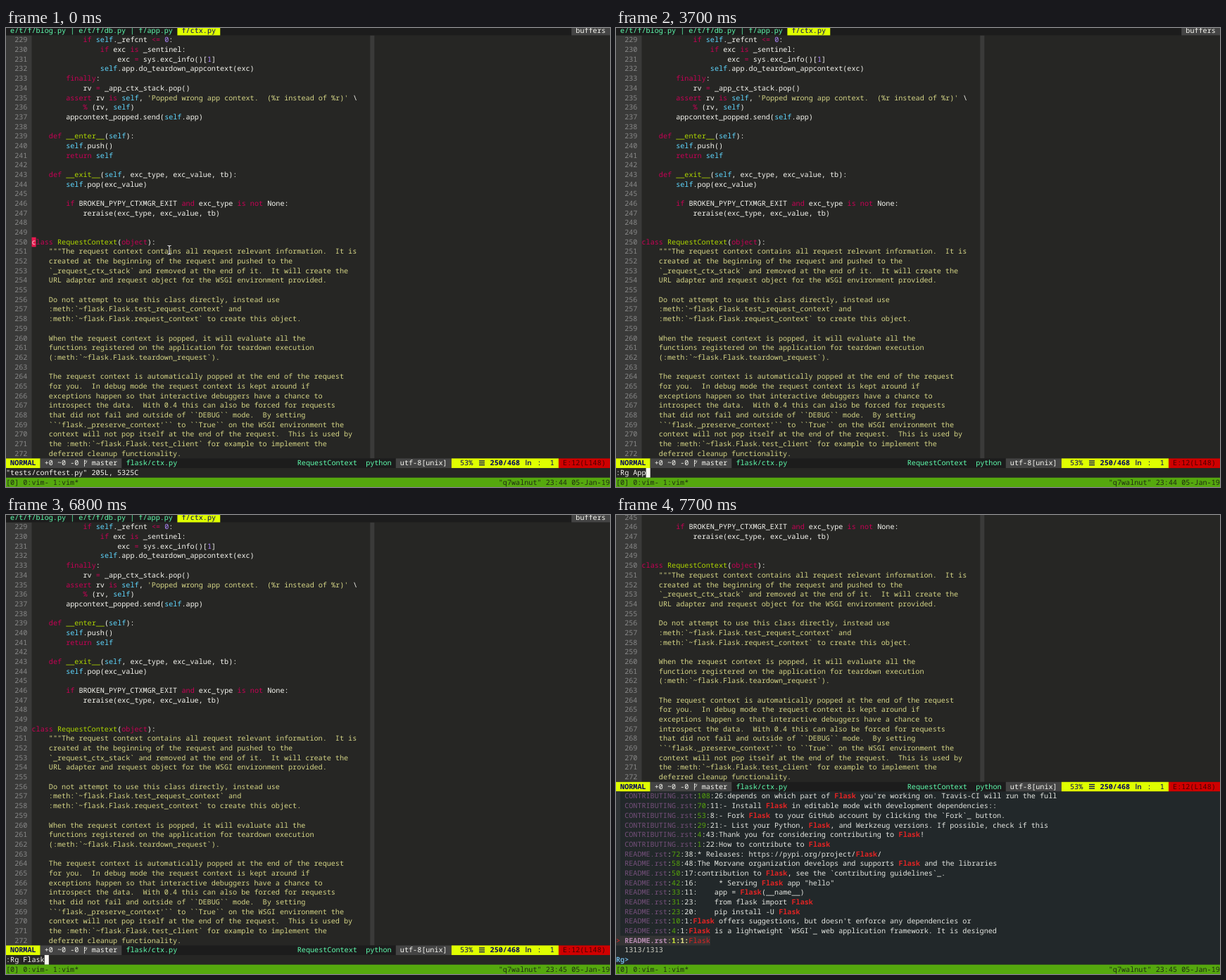
Write an HTML page that moves like this. It is 858 px wide and 653 px high and loops after 8 s.

```html
<!DOCTYPE html>
<html lang="en">
<head>
<meta charset="utf-8">
<title>Searching a project from the editor</title>
<style>
html, body { margin: 0; width: 100%; height: 100%; overflow: hidden; background: #262624; }
svg { display: block; width: 858px; height: 653px; }
text { font-family: "Noto Sans Mono", "DejaVu Sans Mono", monospace; font-size: 10.142px; white-space: pre; text-rendering: geometricPrecision; }
</style>
</head>
<body>
<svg id="stage" viewBox="0 0 858 653"></svg>
<script>
const CW = 858 / 141, RH = 13.68, TOP = -3.25, BASE = 10, LOOP = 8000;
const C = {
  bg: '#262624', gutter: '#3a3a39', num: '#878787', fg: '#f8f8f2', str: '#d7d787',
  key: '#c80055', name: '#afd700', self: '#5fd7ff', digit: '#af87ff',
  lime: '#dfff00', navy: '#00005f', grey: '#444444', bar: '#1c1c1c', mint: '#5fffaf',
  green: '#55a80e', ink: '#1f2a14', panel: '#22282a', path: '#75507b', match: '#e02424'
};
const stage = document.getElementById('stage');
const x = col => col * CW;
const y = row => TOP + row * RH;

function add(parent, tag, attrs) {
  const el = document.createElementNS('http://www.w3.org/2000/svg', tag);
  for (const k in attrs) el.setAttribute(k, attrs[k]);
  return parent.appendChild(el);
}
const group = () => add(stage, 'g', {});
function block(parent, row, col, cols, fill, rows = 1) {
  return add(parent, 'rect', { x: x(col), y: y(row), width: x(cols), height: rows * RH, fill });
}
// Draws a run of text on the character grid and returns the next column.
function put(parent, row, col, str, fill, bold) {
  const lead = str.length - str.trimStart().length;
  if (str.trim()) {
    const el = add(parent, 'text', { x: x(col + lead), y: y(row) + BASE, fill, 'font-weight': bold ? 700 : 400 });
    el.textContent = str.trim();
  }
  return col + str.length;
}
const show = (el, on) => el.setAttribute('visibility', on ? 'visible' : 'hidden');
const shift = (el, rows) => el.setAttribute('transform', `translate(0 ${-rows * RH})`);

const code = `            if self._refcnt <= 0:
                if exc is _sentinel:
                    exc = sys.exc_info()[1]
                self.app.do_teardown_appcontext(exc)
        finally:
            rv = _app_ctx_stack.pop()
        assert rv is self, 'Popped wrong app context.  (%r instead of %r)' \\
            % (rv, self)
        appcontext_popped.send(self.app)

    def __enter__(self):
        self.push()
        return self

    def __exit__(self, exc_type, exc_value, tb):
        self.pop(exc_value)

        if BROKEN_PYPY_CTXMGR_EXIT and exc_type is not None:
            reraise(exc_type, exc_value, tb)


class RequestContext(object):`.split('\n');

const doc = `    """The request context contains all request relevant information.  It is
    created at the beginning of the request and pushed to the
    \`_request_ctx_stack\` and removed at the end of it.  It will create the
    URL adapter and request object for the WSGI environment provided.

    Do not attempt to use this class directly, instead use
    :meth:\`~flask.Flask.test_request_context\` and
    :meth:\`~flask.Flask.request_context\` to create this object.

    When the request context is popped, it will evaluate all the
    functions registered on the application for teardown execution
    (:meth:\`~flask.Flask.teardown_request\`).

    The request context is automatically popped at the end of the request
    for you.  In debug mode the request context is kept around if
    exceptions happen so that interactive debuggers have a chance to
    introspect the data.  With 0.4 this can also be forced for requests
    that did not fail and outside of \`\`DEBUG\`\` mode.  By setting
    \`\`'flask._preserve_context'\`\` to \`\`True\`\` on the WSGI environment the
    context will not pop itself at the end of the request.  This is used by
    the :meth:\`~flask.Flask.test_client\` for example to implement the
    deferred cleanup functionality.`.split('\n');

const results = `CONTRIBUTING.rst:108:26:depends on which part of Flask you're working on. Travis-CI will run the full
CONTRIBUTING.rst:70:11:- Install Flask in editable mode with development dependencies::
CONTRIBUTING.rst:53:8:- Fork Flask to your GitHub account by clicking the \`Fork\`_ button.
CONTRIBUTING.rst:29:21:- List your Python, Flask, and Werkzeug versions. If possible, check if this
CONTRIBUTING.rst:4:43:Thank you for considering contributing to Flask!
CONTRIBUTING.rst:1:22:How to contribute to Flask
README.rst:72:38:* Releases: https://pypi.org/project/Flask/
README.rst:58:48:The Morvane organization develops and supports Flask and the libraries
README.rst:50:17:contribution to Flask, see the \`contributing guidelines\`_.
README.rst:42:16:     * Serving Flask app "hello"
README.rst:33:11:    app = Flask(__name__)
README.rst:31:23:    from flask import Flask
README.rst:23:20:    pip install -U Flask
README.rst:10:1:Flask offers suggestions, but doesn't enforce any dependencies or
README.rst:4:1:Flask is a lightweight \`WSGI\`_ web application framework. It is designed
README.rst:1:1:Flask`.split('\n');

const syntax = /(?<str>'.*?')|(?<name>(?<=def |class )\w+)|(?<key>\b(?:if|is|not|and|finally|assert|def|class|return|object)\b|<=|=|%)|(?<self>\bself\b)|(?<digit>\b\d+\b)/g;

function codeLine(parent, row, line) {
  let at = 0;
  for (const m of line.matchAll(syntax)) {
    put(parent, row, 6 + at, line.slice(at, m.index), C.fg);
    const kind = Object.keys(m.groups).find(k => m.groups[k]);
    put(parent, row, 6 + m.index, m[0], C[kind]);
    at = m.index + m[0].length;
  }
  put(parent, row, 6 + at, line.slice(at), C.fg);
}

function buildEditor() {
  const g = group();
  block(g, 1, 0, 6, C.gutter, 44);
  block(g, 1, 85, 1, C.gutter, 44);
  for (let row = 1; row <= 44; row++) put(g, row, 2, String(228 + row), C.num);
  code.forEach((line, i) => codeLine(g, 1 + i, line));
  doc.forEach((line, i) => put(g, 23 + i, 6, line, C.str));
  return g;
}

function buildTabs() {
  const g = group();
  block(g, 0, 0, 141, C.bar);
  put(g, 0, 1, 'e/t/f/blog.py | e/t/f/db.py | f/app.py', C.mint);
  block(g, 0, 40, 10, C.lime);
  put(g, 0, 41, 'f/ctx.py', C.navy);
  block(g, 0, 132, 9, C.grey);
  put(g, 0, 133, 'buffers', C.fg);
  return g;
}

function buildStatus() {
  const g = group(), row = 45, top = y(row);
  block(g, row, 0, 141, C.bar);
  block(g, row, 0, 8, C.lime);
  put(g, row, 1, 'NORMAL', C.navy, true);
  block(g, row, 8, 19, C.grey);
  put(g, row, 9, '+0 ~0 -0', C.fg);
  add(g, 'path', { d: `M111.5 ${top + 11.5}v-9.5M111.5 ${top + 8}q3.2 -1.5 3.4 -5M111.5 ${top + 5}q1.5 -.8 1.6 -2.6`, fill: 'none', stroke: C.fg, 'stroke-width': .8 });
  put(g, row, 20, 'master', C.fg);
  put(g, row, 28, 'flask/ctx.py', C.mint);
  put(g, row, 68, 'RequestContext', C.mint);
  put(g, row, 84, 'python', C.mint);
  block(g, row, 91, 13, C.grey);
  put(g, row, 92, 'utf-8[unix]', C.fg);
  block(g, row, 104, 25, C.lime);
  put(g, row, 106, '53%', C.navy);
  for (const dy of [3, 5.8, 8.6]) add(g, 'rect', { x: 672, y: top + dy, width: 8, height: 1.3, fill: C.navy });
  put(g, row, 113, '250/468', C.navy, true);
  const ln = add(g, 'text', { x: 737.5, y: top + BASE, fill: C.navy, style: 'font: 600 10px "Open Sans", sans-serif' });
  ln.textContent = 'ln';
  put(g, row, 124, ':  1', C.navy);
  block(g, row, 129, 12, '#cf0000');
  put(g, row, 130, 'E:12(L148)', '#4a0000');
  return g;
}

function buildResults() {
  const g = group();
  block(g, 29, 0, 141, C.panel, 18);
  block(g, 29, 0, 1, '#303436', 16);
  results.forEach((line, i) => {
    const row = 29 + i, picked = i === results.length - 1;
    const [, file, num, rest] = line.match(/^(.*?):(\d+)(:.*)$/);
    if (picked) {
      block(g, row, 0, 22, '#343434');
      put(g, row, 0, '>', C.match);
    }
    const plain = picked ? '#e4e48a' : '#e6e8e3';
    let col = put(g, row, 2, file, picked ? '#b58ab0' : C.path, picked);
    col = put(g, row, col, ':', plain);
    col = put(g, row, col, num, picked ? '#c5e234' : '#56a50a', picked);
    for (const part of rest.split(/(Flask)/)) {
      const hit = part === 'Flask';
      col = put(g, row, col, part, hit ? C.match : plain, picked ? !hit : hit);
    }
  });
  put(g, 45, 2, '1313/1313', '#d0d0c4');
  put(g, 46, 0, 'Rg>', '#6fb3dc', true);
  return g;
}

function buildPointer() {
  const g = group();
  const d = 'M229.5 309.5q2.5 0 2.5 1.5q0 -1.5 2.5 -1.5M232 311v9.5M229.5 322q2.5 0 2.5 -1.5q0 1.5 2.5 1.5';
  add(g, 'path', { d, fill: 'none', stroke: '#111', 'stroke-width': 2.4 });
  add(g, 'path', { d, fill: 'none', stroke: '#fff', 'stroke-width': 1.1 });
  return g;
}

const editor = buildEditor();
const codeCursor = group();
block(codeCursor, 22, 6, 1, '#e8194f');
put(codeCursor, 22, 6, 'c', '#f8d0d8');
const pointer = buildPointer();
const tabs = buildTabs();
const blank = block(stage, 29, 0, 141, C.bg, 18);
const status = buildStatus();
const list = buildResults();
const command = add(stage, 'text', { x: 0, y: y(46) + BASE, fill: C.fg });
const cursor = block(stage, 46, 0, 1, '#f8f8f0');
const tmux = group();
block(tmux, 47, 0, 141, C.green);
put(tmux, 47, 0, '[0] 0:vim- 1:vim*', C.ink);
put(tmux, 47, 115, '"q7walnut"', C.ink);
const clock = add(tmux, 'text', { x: x(126), y: y(47) + BASE, fill: C.ink });

const typing = [
  [0, '"tests/conftest.py" 205L, 5325C'], [1000, ':'], [1100, ':R'], [1300, ':Rg'], [1500, ':Rg '],
  [2500, ':Rg C'], [3400, ':Rg A'], [3600, ':Rg Ap'], [3700, ':Rg App'], [5900, ':Rg A'], [6100, ':Rg '],
  [6300, ':Rg F'], [6500, ':Rg Fl'], [6600, ':Rg Fla'], [6700, ':Rg Flas'], [6800, ':Rg Flask'], [7100, '']
];
const blinks = [[600, 700], [4300, 4900], [5500, 5700], [7700, 8000]];

function render(t) {
  const typed = typing.findLast(step => step[0] <= t)[1];
  const lit = !blinks.some(([from, to]) => t >= from && t < to);
  const split = t >= 7100, found = t >= 7300;

  shift(editor, split ? 17 : 0);
  shift(status, split ? 17 : 0);
  show(tabs, !split);
  show(blank, split);
  show(list, found);
  show(pointer, t < 700);
  show(codeCursor, lit && t < 1000);

  command.textContent = typed;
  cursor.setAttribute('x', x(found ? 4 : typed.length));
  cursor.setAttribute('y', y(split && !found ? 29 : 46));
  show(cursor, lit && t >= 1000);
  clock.textContent = (t < 4100 ? '23:44' : '23:45') + ' 05-Jan-19';
}

const start = performance.now();
function tick() {
  render((performance.now() - start) % LOOP);
  requestAnimationFrame(tick);
}
tick();
</script>
</body>
</html>
```
